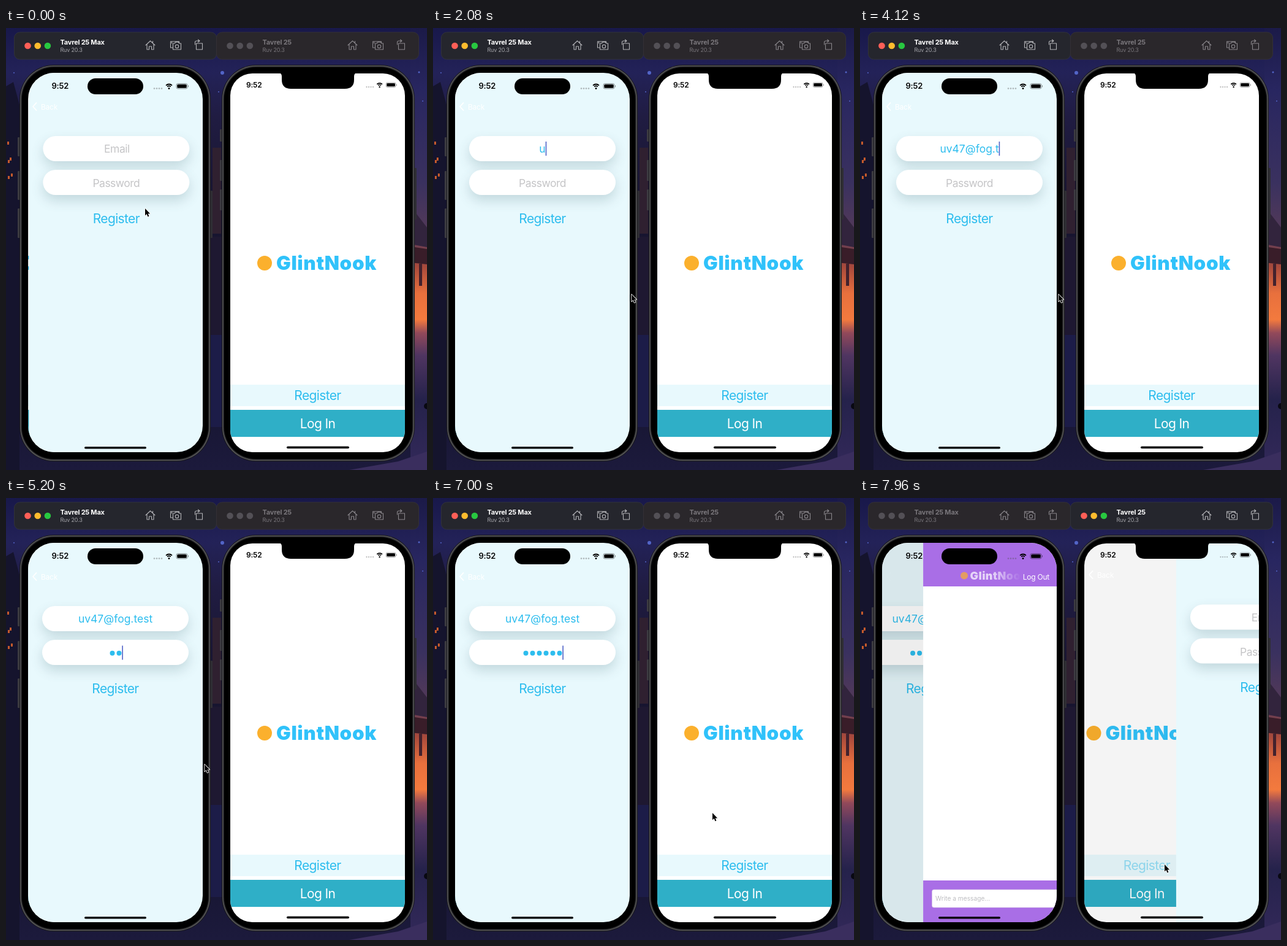
An HTML page with a canvas for the animation above (8000 ms loop, 687x720 px).

```html
<!DOCTYPE html>
<html lang="en">
<head>
<meta charset="utf-8">
<title>Two phones</title>
<style>
  html, body { margin: 0; width: 100%; height: 100%; overflow: hidden; background: #15142e; }
  canvas { display: block; }
</style>
</head>
<body>
<canvas id="stage" width="687" height="720"></canvas>
<script>
const ctx = document.getElementById('stage').getContext('2d');
const LOOP = 8000, STEP = 40, W = 285;
const BRAND = 'GlintNook', EMAIL = 'uv47@fog.test';
const BLUE = '#2dbdee', PALE = '#e8f9fd', PURPLE = '#a96ee6', LOGO = '#fbb02d';

// Event times in ms
const FOCUS_EMAIL = 700, TYPE_EMAIL = 1950, KEY_GAP = 240;
const FOCUS_PASS = 4920, TYPE_PASS = 5000, DOT_GAP = 165;
const LEFT_PRESS = 6330, RIGHT_PRESS = 7730;
const LEFT_FORM = -385, LEFT_CHAT = 7817.5, RIGHT_FORM = 7878;

const POINTER = [
  [0, 227, 294], [120, 227, 294], [550, 196, 204], [750, 196, 204], [1120, 329, 410],
  [1280, 324, 434], [5900, 324, 434], [6250, 188, 314], [6420, 188, 314],
  [7000, 456, 513], [7400, 497, 597], [8000, 497, 597]
];

const clamp = v => Math.max(0, Math.min(1, v));
const typed = (t, start, gap, max) =>
  t < start ? 0 : Math.min(max, Math.floor((t - start) / gap) + 1);

// Critically damped spring used by every screen push
function push(t, start) {
  const x = Math.max(0, t - start) * 0.01947;
  return 1 - (1 + x) * Math.exp(-x);
}

function pressAlpha(t, start, hold) {
  return t < start ? 1 : 0.2 + 0.8 * clamp((t - start - hold) / 270);
}

function rect(x, y, w, h, color) {
  ctx.fillStyle = color;
  ctx.fillRect(x, y, w, h);
}

function round(x, y, w, h, r, color) {
  ctx.beginPath();
  ctx.roundRect(x, y, w, h, r);
  if (color) { ctx.fillStyle = color; ctx.fill(); }
}

function circle(x, y, r, color) {
  ctx.beginPath();
  ctx.arc(x, y, r, 0, 7);
  ctx.fillStyle = color;
  ctx.fill();
}

function text(str, x, y, size, color, { weight = 400, align = 'left', track = -0.02 } = {}) {
  ctx.font = `${weight} ${size}px Inter, sans-serif`;
  ctx.letterSpacing = `${track * size}px`;
  ctx.textAlign = align;
  ctx.fillStyle = color;
  ctx.fillText(str, x, y);
  return ctx.measureText(str).width;
}

function poly(points, color) {
  ctx.beginPath();
  points.forEach(([x, y]) => ctx.lineTo(x, y));
  ctx.closePath();
  ctx.fillStyle = color;
  ctx.fill();
}

function strokePath(d, color, width) {
  ctx.strokeStyle = color;
  ctx.lineWidth = width;
  ctx.lineCap = ctx.lineJoin = 'round';
  ctx.stroke(new Path2D(d));
}

function withAlpha(alpha, draw) {
  ctx.save();
  ctx.globalAlpha *= alpha;
  draw();
  ctx.restore();
}

function gradient(y0, y1, ...stops) {
  const g = ctx.createLinearGradient(0, y0, 0, y1);
  stops.forEach(([at, color]) => g.addColorStop(at, color));
  return g;
}

function wallpaper() {
  rect(0, 0, 687, 720, gradient(0, 720,
    [0, '#18184a'], [.1, '#232258'], [.2, '#201c42'], [.4, '#181530'], [.8, '#15142f'], [1, '#1c1a3c']));
  poly([[0, 95], [12, 88], [22, 125], [22, 720], [0, 720]], '#15142d');
  [[2, 185], [6, 211], [3, 215], [8, 237], [3, 241]].forEach(([x, y]) => rect(x, y, 3, 5, '#c45a2c'));
  rect(337, 195, 14, 140, '#2f2030');
  rect(334, 340, 18, 160, '#1e1831');
  rect(334, 500, 18, 150, '#1c1c48');
  rect(660, 0, 27, 720, gradient(0, 720,
    [0, '#1b1a48'], [.14, '#282660'], [.35, '#3a315f'], [.47, '#553a58'], [.54, '#a84a3c'],
    [.6, '#e8703d'], [.66, '#f37a3e'], [.69, '#92495a'], [.74, '#503561'], [.84, '#25224b'], [1, '#33295a']));
  poly([[660, 290], [687, 325], [687, 357], [660, 352]], '#32243d');
  poly([[660, 356], [687, 360], [687, 385], [660, 382]], '#391d29');
  rect(674, 384, 5, 36, '#43222d');
  poly([[560, 720], [640, 706], [687, 690], [687, 720]], '#3a2e5e');
  circle(687, 616, 5, '#090912');
  [[353, 73, 3], [347, 104, 1], [674, 72, 1.5], [680, 119, 1], [13, 73, 1]]
    .forEach(([x, y, r]) => circle(x, y, r, '#5365c8'));
}

function titleBar(x, name, active) {
  round(x, 7, 330, 44, 9, active ? '#25262d' : '#2a272b');
  ctx.strokeStyle = active ? '#31323a' : '#343035';
  ctx.lineWidth = 1;
  ctx.stroke();
  ['#ff5f57', '#febc2e', '#28c840'].forEach((c, i) =>
    circle(x + 22 + i * 16.2, 29, 5.3, active ? c : '#535056'));
  text(name, x + 75, 27, 11, active ? '#fff' : '#79767b', { weight: 700 });
  text('Ruv 20.3', x + 75, 38.5, 9, active ? '#a5a5aa' : '#79767b');
  ctx.save();
  ctx.translate(x + 222, 28);
  const ink = active ? '#b4b4b8' : '#89868b';
  strokePath('M-7.5 0L0-7L7.5 0M-5.5-1V7H-2V2H2V7H5.5V-1M4-6.5V-4', ink, 1.1);
  strokePath('M35-3V-6H47V-4M35-6H33V4H36M37-3H40L41-5H46L47-3H50V7H37ZM46.2 2A2.7 2.7 0 1 1 40.8 2A2.7 2.7 0 1 1 46.2 2', ink, 1.1);
  strokePath('M75-3H85V7H75ZM73-1V-5Q73-7 76-7H80M78-9L80.5-7L78-5', ink, 1.1);
  ctx.restore();
}

function phoneBody(x, w, buttonsLeft, buttonRight) {
  buttonsLeft.forEach(([y, h]) => round(x - 3, y, 5, h, 1, '#3b3a40'));
  round(x + w - 2, buttonRight[0], 5, buttonRight[1], 1, '#302f35');
  round(x, 60, w, 646, 56, '#17171a');
  round(x + 1, 61, w - 2, 644, 55, '#555557');
  round(x + 2.5, 62.5, w - 5, 641, 54, '#222224');
  round(x + 4, 64, w - 8, 638, 52, '#000');
}

function statusBar(timeX, timeY, size, iconX, iconY, scale) {
  text('9:52', timeX, timeY, size, '#050505', { weight: 600 });
  ctx.save();
  ctx.translate(iconX, iconY);
  ctx.scale(scale, scale);
  for (let i = 0; i < 4; i++) circle(i * 4, 4, 1.3, 'rgba(80,80,80,.4)');
  circle(24, 4, 1.4, '#000');
  [4, 7].forEach(r => {
    ctx.beginPath();
    ctx.arc(24, 4, r, -2.35, -.79);
    ctx.strokeStyle = '#000';
    ctx.lineWidth = 1.8;
    ctx.lineCap = 'butt';
    ctx.stroke();
  });
  round(36, -4, 18, 8.5, 2.5);
  ctx.strokeStyle = 'rgba(0,0,0,.4)';
  ctx.lineWidth = 1;
  ctx.stroke();
  round(37.3, -2.7, 15.4, 5.9, 1.5, '#000');
  rect(55, -1.2, 1, 3, 'rgba(0,0,0,.4)');
  ctx.restore();
}

function welcome(registerAlpha) {
  rect(0, 60, W, 640, '#fff');
  circle(56, 383, 12, LOGO);
  text(BRAND, 75, 394, 31.5, '#30c2fa', { weight: 900, track: 0.02 });
  rect(0, 581, W, 35, PALE);
  rect(0, 622, W, 44, '#2fafc7');
  withAlpha(registerAlpha, () => text('Register', W / 2, 606, 21, BLUE, { align: 'center', track: -0.03 }));
  text('Log In', W / 2, 652, 21, '#fff', { align: 'center', track: -0.03 });
}

function caret(x, y, sinceInput) {
  if (sinceInput % 1000 < 600) rect(x, y - 11.5, 1.6, 23, '#4f62c8');
}

function form({ email = 0, dots = 0, focus = null, sinceInput = 0, registerAlpha = 1 }, dy) {
  rect(0, 60, W, 640, PALE);
  ctx.save();
  ctx.translate(0, dy);
  const mid = W / 2, centre = { align: 'center', track: -0.03 };
  [176, 231].forEach(y => {
    ctx.save();
    ctx.shadowColor = 'rgba(70,110,120,.24)';
    ctx.shadowBlur = 20;
    ctx.shadowOffsetY = 9;
    round(23, y, 239, 41, 20.5, '#fff');
    ctx.restore();
  });

  const emailWidth = email
    ? text(EMAIL.slice(0, email), mid, 203, 17.5, BLUE, { align: 'center', track: 0 })
    : text('Email', mid + 1, 203, 17.5, '#c5c5c7', centre);
  if (focus === 'email') caret(email ? mid + emailWidth / 2 : mid - emailWidth / 2 - 1.5, 196.5, sinceInput);

  for (let i = 0; i < dots; i++) circle(mid + .5 + (i - (dots - 1) / 2) * 11, 252.7, 4, BLUE);
  const passCaret = dots
    ? mid + (dots - 1) * 5.5 + 5.3
    : mid - text('Password', mid, 259, 17.5, '#c5c5c7', centre) / 2 - 2;
  if (focus === 'password') caret(passCaret, 252, sinceInput);

  withAlpha(registerAlpha, () => text('Register', mid, 318, 21, BLUE, centre));
  ctx.restore();
}

function chat() {
  rect(0, 60, W, 640, '#fff');
  rect(0, 60, W, 84, PURPLE);
  rect(0, 623, W, 80, PURPLE);
  round(14.5, 638, 256, 29, 3, '#fff');
  ctx.strokeStyle = '#dcd6e3';
  ctx.lineWidth = .6;
  ctx.stroke();
  text('Write a message...', 20, 656, 10.2, '#bdbdc1', { track: 0 });
}

function backButton(y, alpha, slide) {
  withAlpha(clamp(alpha), () => {
    strokePath(`M13.5 ${y - 6}L8 ${y}L13.5 ${y + 6}`, '#fff', 1.8);
    text('Back', 21 - slide, y + 4.5, 12, '#fff');
  });
}

function chatNav(p) {
  withAlpha(clamp((p - .2) / .5), () => text('Log Out', 273, 132.5, 12, '#fff', { align: 'right' }));
  withAlpha(clamp((p - .34) / .6), () => {
    const x = 87 + (1 - p) * 168;
    const fade = ctx.createLinearGradient(180, 0, 226, 0);
    fade.addColorStop(0, '#fff');
    fade.addColorStop(1, 'rgba(255,255,255,0)');
    circle(x + 7.5, 126.5, 6, LOGO);
    text(BRAND, x + 17, 133, 18, fade, { weight: 900, track: 0.02 });
  });
}

// Draws a view that has slid in by "shown" and is covered by "covered"
function layer(shown, covered, draw) {
  if (shown <= 0) return;
  ctx.save();
  ctx.translate((1 - shown) * W - covered * W * .3, 0);
  draw();
  rect(0, 60, W, 640, `rgba(0,0,0,${.09 * covered})`);
  ctx.restore();
}

function screen(x, y, h, r, draw) {
  ctx.save();
  round(x, y, W, h, r);
  ctx.clip();
  ctx.translate(x, 0);
  draw();
  ctx.restore();
}

function leftPhone(t) {
  const formIn = push(t, LEFT_FORM), chatIn = push(t, LEFT_CHAT);
  const email = typed(t, TYPE_EMAIL, KEY_GAP, EMAIL.length);
  const dots = typed(t, TYPE_PASS, DOT_GAP, 6);
  let focus = null, lastInput = 0;
  if (t >= FOCUS_PASS && t < LEFT_CHAT) {
    focus = 'password';
    lastInput = dots ? TYPE_PASS + (dots - 1) * DOT_GAP : FOCUS_PASS;
  } else if (t >= FOCUS_EMAIL && t < FOCUS_PASS) {
    focus = 'email';
    lastInput = email ? TYPE_EMAIL + (email - 1) * KEY_GAP : FOCUS_EMAIL;
  }
  const state = { email, dots, focus, sinceInput: t - lastInput, registerAlpha: pressAlpha(t, LEFT_PRESS, 80) };

  phoneBody(22, 312, [[178, 31], [233, 47], [294, 48]], [265, 77]);
  screen(36, 73, 618, 43, () => {
    layer(1, formIn, () => welcome(1));
    layer(formIn, chatIn, () => form(state, 0));
    layer(chatIn, 0, chat);
    backButton(128, 1 - chatIn * 1.25, chatIn * 40);
    chatNav(chatIn);
  });
  statusBar(74.5, 99, 13, 242, 94.5, 1);
  round(133, 82, 91, 26, 13, '#000');
  round(128, 682, 101, 3.6, 1.8, '#08080a');
}

function rightPhone(t) {
  const formIn = push(t, RIGHT_FORM);
  phoneBody(352, 315, [[165, 20], [215, 34], [263, 34]], [228, 84]);
  screen(366, 74, 617, 36, () => {
    layer(1, formIn, () => welcome(pressAlpha(t, RIGHT_PRESS, 144)));
    layer(formIn, 0, () => form({}, -2.5));
    backButton(125, formIn * 3, 0);
  });
  statusBar(392, 97, 12, 588.5, 92.5, .88);
  ctx.fillStyle = '#000';
  ctx.fill(new Path2D('M446 73H572Q568 74 568 79V84Q568 99 553 99H465Q450 99 450 84V79Q450 74 446 73Z'));
  round(458, 681.5, 102, 3.6, 1.8, '#000');
}

function pointer(t) {
  const i = POINTER.findIndex(p => p[0] > t);
  const [t0, x0, y0] = POINTER[i - 1], [t1, x1, y1] = POINTER[i];
  const u = (t - t0) / (t1 - t0), e = u * u * (3 - 2 * u);
  ctx.save();
  ctx.translate(x0 + (x1 - x0) * e, y0 + (y1 - y0) * e);
  const arrow = new Path2D('M0 0V11.5L2.6 9.1L4.5 13.4L6.4 12.6L4.6 8.4H8.2Z');
  ctx.lineJoin = 'round';
  ctx.lineWidth = 1.6;
  ctx.strokeStyle = '#fff';
  ctx.stroke(arrow);
  ctx.fillStyle = '#000';
  ctx.fill(arrow);
  ctx.restore();
}

function draw(t) {
  const leftActive = t < RIGHT_PRESS;
  wallpaper();
  titleBar(13.5, 'Tavrel 25 Max', leftActive);
  titleBar(343.5, 'Tavrel 25', !leftActive);
  leftPhone(t);
  rightPhone(t);
  pointer(t);
}

const began = performance.now();
function tick() {
  const t = Math.floor(((performance.now() - began) % LOOP) / STEP) * STEP;
  draw(t < 120 ? 0 : t);
  requestAnimationFrame(tick);
}
tick();
</script>
</body>
</html>
```
